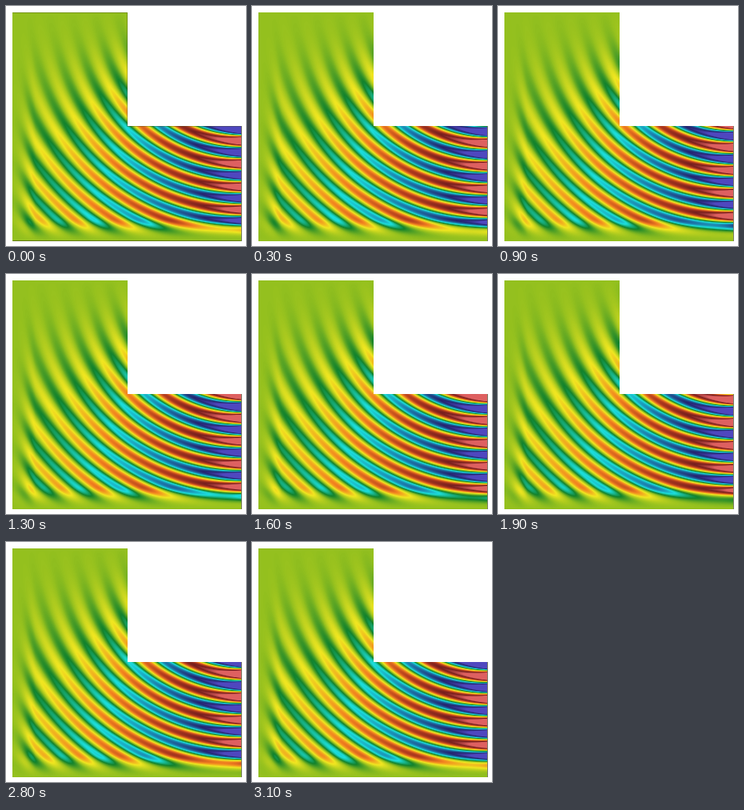
Recreate the animation shown at these times as an HTML page with a canvas. Size 300 by 300 pixels, loop 3200 ms.

```html
<!DOCTYPE html>
<html lang="en">
<head>
<meta charset="utf-8">
<title>Dipole wave in an L-shaped domain</title>
<style>
  html, body { margin: 0; width: 100%; height: 100%; overflow: hidden; background: #fff; }
  canvas { display: block; width: 300px; height: 300px; }
</style>
</head>
<body>
<canvas id="stage" width="300" height="300"></canvas>
<script>
const SIZE = 300, STEPS = 32, STEP_MS = 100;
const MIN = 8, MAX = 294, SIDE = MAX - MIN;
const CORNER = { x: 152, y: 150 };

// Lengths in units of the domain side
const K = 2 * Math.PI * 10;
const LAYER = 0.1, DAMPING = 5;

// Evenly spaced colours from the lowest to the highest value
const PALETTE = ["#5048c0", "#242470", "#1c78aa", "#1cdedc", "#12822c", "#94c01e",
                 "#f0e620", "#f28220", "#b43c1e", "#761e1e", "#de6060"];
const LIMIT = 2, LEVELS = 1024;

function paletteLevels() {
  const canvas = document.createElement("canvas");
  canvas.width = LEVELS;
  canvas.height = 1;
  const pen = canvas.getContext("2d");
  const gradient = pen.createLinearGradient(0, 0, LEVELS, 0);
  PALETTE.forEach((color, i) => gradient.addColorStop(i / (PALETTE.length - 1), color));
  pen.fillStyle = gradient;
  pen.fillRect(0, 0, LEVELS, 1);
  return pen.getImageData(0, 0, LEVELS, 1).data;
}

// Damped wave in an absorbing layer plus its reflection off the outer wall
function absorb(depth, cosine, reflection) {
  const rate = DAMPING * cosine, s2 = depth * depth;
  return Math.exp(-rate * s2) + reflection * Math.exp(-rate * (2 - s2));
}

// Horizontal field of a dipole at the top right corner, as amplitude and phase
function fieldAt(px, py) {
  const dx = (MAX + 0.5 - px) / SIDE, dy = (py - MIN) / SIDE;
  const r = Math.hypot(dx, dy), cos = dx / r, sin = dy / r;
  const depthX = Math.max(0, (dx - 1) / LAYER + 1);
  const depthY = Math.max(0, (dy - 1) / LAYER + 1);
  const far = sin * sin, near = (far - cos * cos) / (K * r);
  const stretch = 2 * DAMPING / (K * LAYER) * depthX;
  return {
    amp: 1.35 / Math.sqrt(r) * Math.hypot(far, near) * Math.hypot(1, stretch)
      * absorb(depthX, cos, 1) * absorb(depthY, sin, -1),
    phase: K * r - Math.PI / 4 + Math.atan2(near, far) + Math.atan(stretch)
  };
}

const levels = paletteLevels();
const cells = [];
for (let y = MIN; y < MAX; y++) {
  for (let x = MIN; x < MAX; x++) {
    if (x >= CORNER.x && y < CORNER.y) continue;
    cells.push({ at: (y * SIZE + x) * 4, ...fieldAt(x + 0.5, y + 0.5) });
  }
}

const ctx = document.getElementById("stage").getContext("2d");
const image = ctx.createImageData(SIZE, SIZE);
image.data.fill(255);

function drawOutline() {
  ctx.strokeStyle = "rgba(60, 70, 10, 0.35)";
  ctx.beginPath();
  ctx.moveTo(MIN + 0.5, MIN + 0.5);
  ctx.lineTo(CORNER.x - 0.5, MIN + 0.5);
  ctx.lineTo(CORNER.x - 0.5, CORNER.y + 0.5);
  ctx.lineTo(MAX - 0.5, CORNER.y + 0.5);
  ctx.moveTo(MAX - 0.5, MAX - 0.5);
  ctx.lineTo(MIN + 0.5, MAX - 0.5);
  ctx.closePath();
  ctx.stroke();
}

function render(step) {
  const shift = 2 * Math.PI * step / STEPS;
  for (const { at, amp, phase } of cells) {
    const value = -amp * Math.cos(phase - shift);
    const unit = Math.min(1, Math.max(0, (value / LIMIT + 1) / 2));
    const k = Math.round(unit * (LEVELS - 1)) * 4;
    for (let c = 0; c < 3; c++) image.data[at + c] = levels[k + c];
  }
  ctx.putImageData(image, 0, 0);
  if (step === 0) drawOutline();
  ctx.fillStyle = "#7c7f68";
  ctx.fillRect(MAX, CORNER.y, 1, MAX - CORNER.y);
}

let shown = -1;
function tick() {
  const step = Math.floor(performance.now() / STEP_MS) % STEPS;
  if (step !== shown) render(shown = step);
  requestAnimationFrame(tick);
}
tick();
</script>
</body>
</html>
```
